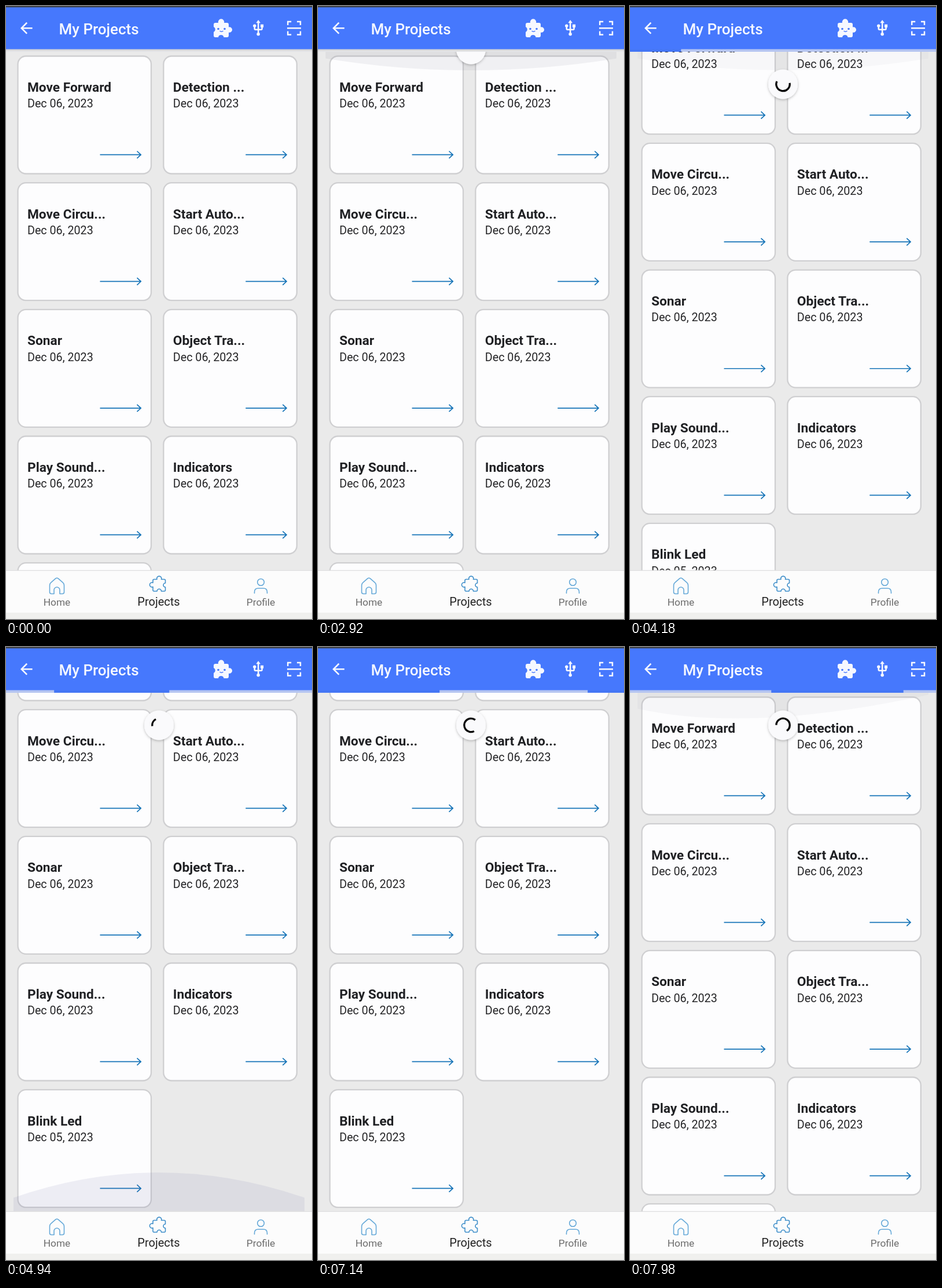
Recreate the animation shown at these times as an HTML page. Size 529 px wide and 1058 px high, loop 8000 ms.

```html
<!DOCTYPE html>
<html lang="en">
<head>
<meta charset="utf-8">
<title>My Projects</title>
<style>
  html, body { margin: 0; width: 100%; height: 100%; overflow: hidden; background: #eaeaea; }
  svg { display: block; width: 100vw; height: 100vh; font-family: Roboto, "Noto Sans", sans-serif; }
  .title { font-size: 22.7px; font-weight: 700; fill: #202124; }
  .date { font-size: 19.7px; fill: #242426; }
  .card { fill: #fdfdfe; stroke: #cfcfd1; stroke-width: 2.3; }
  .arrow { fill: none; stroke: #1674b8; stroke-width: 1.7; }
  .icon { fill: none; stroke-width: 1.6; stroke-linejoin: round; stroke-linecap: round; }
  .tab { font-size: 17.3px; fill: #6c6c6c; text-anchor: middle; }
</style>
</head>
<body>
<svg viewBox="0 0 529 1058" preserveAspectRatio="none">
  <defs>
    <clipPath id="view"><rect y="79" width="529" height="896"/></clipPath>
    <filter id="soft" x="-30%" y="-30%" width="160%" height="160%">
      <feDropShadow dx="0" dy="1.5" stdDeviation="2" flood-opacity=".25"/>
    </filter>
    <linearGradient id="shade" x2="0" y2="1">
      <stop stop-color="#c9cbd2"/><stop offset="1" stop-color="#e9e9ea"/>
    </linearGradient>
  </defs>
  <rect width="529" height="1058" fill="#eaeaea"/>
  <g clip-path="url(#view)">
    <g id="list"></g>
    <path id="topGlow" fill="#565670"/>
    <path id="bottomGlow" fill="#6262a0"/>
    <g id="spinner">
      <circle r="25.5" fill="#fafafc" filter="url(#soft)"/>
      <path id="arc" fill="none" stroke="#050505" stroke-width="3.3"/>
    </g>
  </g>

  <rect y="74" width="529" height="5" fill="url(#shade)"/>
  <g id="bar">
    <rect y="74" width="529" height="5" fill="#b5c5f1"/>
    <rect id="first" y="74" height="5" fill="#4476f5"/>
    <rect id="second" y="74" height="5" fill="#4476f5"/>
  </g>
  <rect width="529" height="74.5" fill="#4678fd"/>
  <rect width="529" height="2.3" fill="#3d4148"/>
  <text x="91.5" y="48.5" font-size="26" font-weight="500" fill="#f6f8ff">My Projects</text>
  <g fill="#f6f8ff">
    <path transform="translate(19.8 22.7) scale(1.29)" d="M20 11H7.83l5.59-5.59L12 4l-8 8 8 8 1.41-1.41L7.83 13H20z"/>
    <path d="M361 29h6a5.2 5.2 0 1 1 10 0h5q3 0 3 3v4.500a4.700 4.700 0 1 1 0 9V51q0 3-3 3h-5.500a4.800 4.800 0 0 0-9.500 0h-5q-3 0-3-3v-6a5 5 0 0 0 0-9v-4q0-3 3-3z"/>
    <path transform="translate(420.8 22.8) scale(1.28)" d="M15 7v4h1v2h-3V5h2l-3-4-3 4h2v8H8v-2.07c.7-.37 1.2-1.08 1.2-1.93 0-1.21-.99-2.2-2.2-2.2s-2.2.99-2.2 2.2c0 .85.5 1.56 1.2 1.93V13c0 1.11.89 2 2 2h3v3.05c-.71.37-1.2 1.1-1.2 1.95a2.2 2.2 0 0 0 4.4 0c0-.85-.49-1.58-1.2-1.95V15h3c1.11 0 2-.89 2-2v-2h1V7z"/>
  </g>
  <g fill="#4678fd"><circle cx="367" cy="39.500" r="1.8"/><circle cx="378" cy="39.500" r="1.8"/></g>
  <path d="M369.500 43q3 2.500 6 0" fill="none" stroke="#4678fd" stroke-width="1.5"/>
  <path d="M487.200 33v-6h6M503 27h6v6M509 43.500v6h-6M493.200 49.500h-6v-6M486 38.200h24" fill="none" stroke="#f6f8ff" stroke-width="2.5"/>

  <rect y="974" width="529" height="74" fill="#fcfcfc"/>
  <rect y="973.6" width="529" height="1.4" fill="#e0e0e1"/>
  <rect y="1047" width="529" height="11" fill="#f0f0ee"/>
  <g class="icon" stroke="#64a8d8">
    <path d="M75.500 1000q0-3 2.200-4.800l8-7q2.300-1.900 4.600 0l8 7q2.200 1.800 2.200 4.800v11.500q0 3-3 3h-4.500v-6.500a5 5 0 0 0-10 0v6.500h-4.500q-3 0-3-3z"/>
    <circle cx="440.500" cy="994.500" r="5.800"/>
    <path d="M429.500 1013.500v-2q0-6.500 6.500-6.500h9q6.500 0 6.500 6.500v2"/>
  </g>
  <path class="icon" stroke="#3f8fca" d="M256 989.500h5a4 4 0 1 1 7.500 0h5q2 0 2 2v4.500a3.500 3.500 0 1 0 0 7v5q0 2-2 2h-5a3.700 3.700 0 0 0-7.400 0h-5.100q-2 0-2-2v-5.500a3.900 3.900 0 1 1 0-7v-4q0-2 2-2z"/>
  <text class="tab" x="88" y="1034.500">Home</text>
  <text class="tab" x="264" y="1034.500" style="font-size:20px;fill:#222">Projects</text>
  <text class="tab" x="440.500" y="1034.500">Profile</text>
</svg>
<script>
const LOOP = 8000, WIDTH = 529, ROW = 218.67;
const $ = id => document.getElementById(id);
const clamp = x => Math.min(1, Math.max(0, x));

const names = ["Move Forward", "Detection ...", "Move Circu...", "Start Auto...", "Sonar",
  "Object Tra...", "Play Sound...", "Indicators", "Blink Led"];
$("list").innerHTML = names.map((name, i) => `
  <g transform="translate(${i % 2 * 251.8} ${Math.floor(i / 2) * ROW})">
    <rect class="card" x="20.5" y="86.5" width="230.5" height="203" rx="14"/>
    <text class="title" x="37" y="148">${name}</text>
    <text class="date" x="37" y="175.3">Dec ${i === 8 ? "05" : "06"}, 2023</text>
    <path class="arrow" d="M162.500 256.700H233M226.500 250.500l6.700 6.200-6.700 6.200"/>
  </g>`).join("");

// Cubic timing curve; solves x by bisection.
function bezier(x1, y1, x2, y2) {
  const at = (a, b, s) => 3 * (1 - s) * (1 - s) * s * a + 3 * (1 - s) * s * s * b + s * s * s;
  return x => {
    if (x <= 0 || x >= 1) return clamp(x);
    let low = 0, high = 1;
    for (let i = 0; i < 24; i++) {
      const mid = (low + high) / 2;
      if (at(x1, x2, mid) < x) low = mid; else high = mid;
    }
    return at(y1, y2, low);
  };
}
const standard = bezier(.4, 0, .2, 1);
const smooth = bezier(.4, 0, .6, 1);
const linear = x => x;

// Value at t on a line through [time, value] points.
function track(t, points, ease = linear) {
  if (t <= points[0][0]) return points[0][1];
  for (let i = 1; i < points.length; i++) {
    const [t0, v0] = points[i - 1], [t1, v1] = points[i];
    if (t < t1) return v0 + (v1 - v0) * ease((t - t0) / (t1 - t0));
  }
  return points[points.length - 1][1];
}

const head2 = bezier(0, 0, .65, 1), tail2 = bezier(.1, 0, .45, 1);

function setBar(id, tail, head) {
  $(id).setAttribute("x", tail);
  $(id).setAttribute("width", Math.max(0, head - tail));
}

function drawBar(t) {
  $("bar").style.display = t >= 3690 ? "" : "none";
  const clock = track(t, [[3690, 0], [4180, 166], [4940, 422], [7140, 1162], [7980, 1430]]);
  setBar("first",
    track(t, [[4440, 0], [4940, 83], [7140, 466], [7440, WIDTH]]),
    track(t, [[3690, 0], [3900, 26], [4180, 88], [4940, 282], [5780, 517], [5900, WIDTH]]));
  setBar("second", WIDTH * tail2((clock - 1267) / 533), WIDTH * head2((clock - 1000) / 567));
}

function drawSpinner(t) {
  const shown = t > 2650;
  $("spinner").style.display = shown ? "" : "none";
  if (!shown) return;
  const y = track(t, [[2650, 50], [3380, 135]], smooth);
  $("spinner").setAttribute("transform", `translate(264.5 ${y})`);

  const clock = track(t, [[3690, 0], [4180, 155], [4940, 315], [7140, 1100], [7980, 1465]]);
  const phase = (667 + clock) / 1333 % 1;
  const head = standard(clamp(phase * 2)), tail = standard(clamp(phase * 2 - 1));
  const pull = track(t, [[2650, 0], [3380, 1]]);
  const start = -145 + 270 * tail + 90 * phase + 360 * clock / 2222 - 120 * (1 - pull);
  const sweep = Math.max(2, 270 * (head - tail) * pull);
  const point = deg => {
    const a = deg * Math.PI / 180;
    return `${11.7 * Math.cos(a)} ${11.7 * Math.sin(a)}`;
  };
  $("arc").setAttribute("d",
    `M${point(start)}A11.7 11.7 0 ${sweep > 180 ? 1 : 0} 1 ${point(start + sweep)}`);
  $("arc").style.opacity = pull;
}

// Bowed overscroll shade growing from an edge; side is 1 downwards, -1 upwards.
function drawGlow(id, edge, side, depth, alpha, skew = 0) {
  const left = depth * (.36 + skew), right = depth * (.36 - skew);
  const control = 2 * depth - (left + right) / 2;
  const y = d => edge + side * d;
  $(id).setAttribute("d",
    `M13 ${edge}V${y(left)}Q${264.5 - skew * 200} ${y(control)} 516 ${y(right)}V${edge}Z`);
  $(id).style.opacity = alpha;
}

function draw(t) {
  const scroll = track(t, [[3960, 0], [4180, 68], [4620, 197], [7500, 197], [7820, 0]]);
  $("list").setAttribute("transform", `translate(0 ${-scroll})`);

  const late = t > 7000;
  const topDepth = late
    ? track(t, [[7800, 0], [7980, 43]])
    : track(t, [[2600, 0], [3400, 80], [3800, 80], [4180, 32], [4340, 0]]);
  const topAlpha = late
    ? track(t, [[7800, 0], [7980, .045]])
    : track(t, [[2600, 0], [3100, .125], [3800, .125], [4180, .035], [4340, 0]]);
  drawGlow("topGlow", 79, 1, topDepth, topAlpha, late ? .28 : 0);
  drawGlow("bottomGlow", 975, -1,
    track(t, [[4600, 0], [4940, 68], [5500, 72], [6400, 0]]),
    track(t, [[4600, 0], [4900, .1], [5500, .1], [6400, 0]]));

  drawSpinner(t);
  drawBar(t);
}

const begin = performance.now();
function tick() {
  draw((performance.now() - begin) % LOOP);
  requestAnimationFrame(tick);
}
tick();
</script>
</body>
</html>
```
